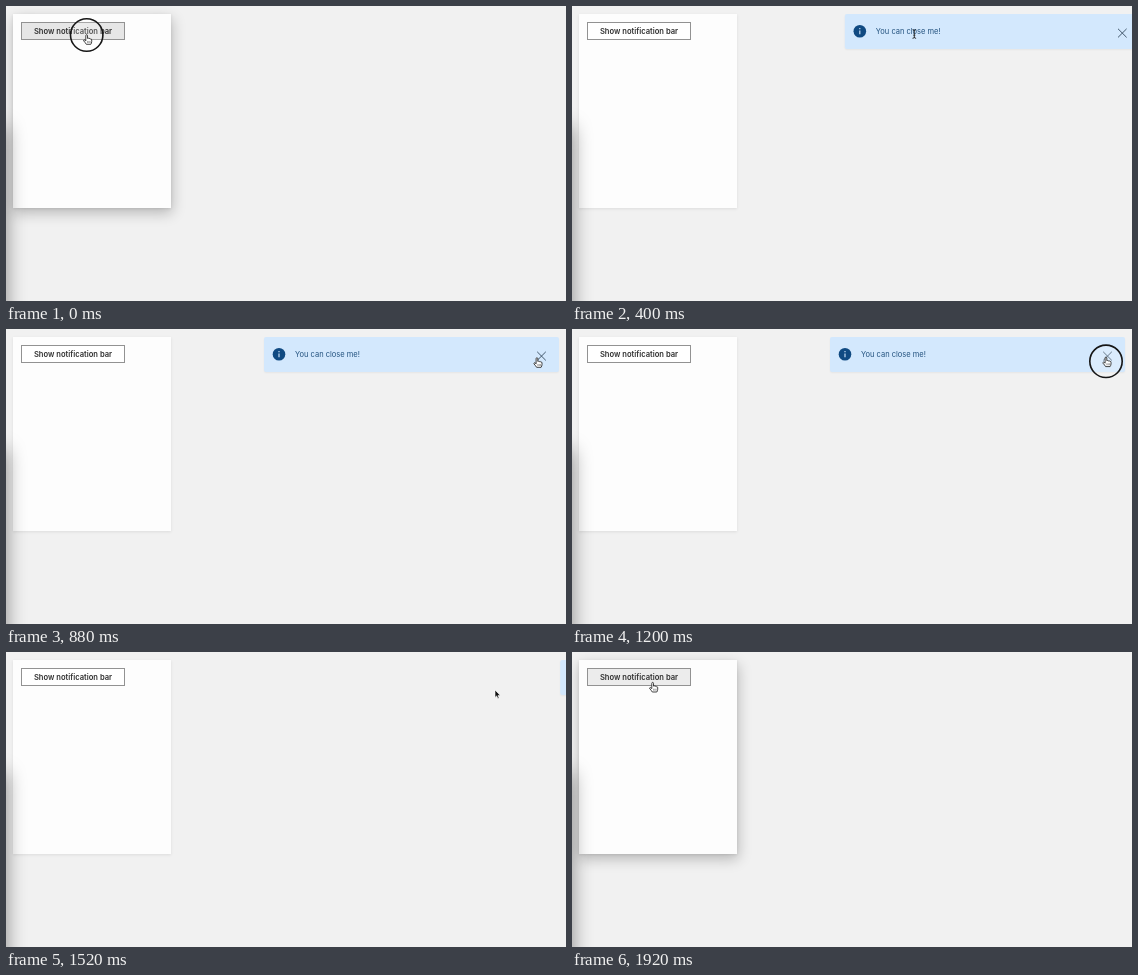
Animation, 560 px wide and 295 px high, one loop 2000 ms. Source, as an HTML page:

```html
<!DOCTYPE html>
<html lang="en">
<head>
<meta charset="utf-8">
<title>Notification bar</title>
<style>
  html, body { margin: 0; width: 560px; height: 295px; overflow: hidden; background: #f1f1f1; }
  #stage { position: relative; width: 560px; height: 295px; overflow: hidden; font-family: Inter, Arial, sans-serif; }
  #stage > * { position: absolute; box-sizing: border-box; }
  #card, #lift { left: 7px; top: 8px; width: 157.5px; height: 194px; }
  #card { background: #fdfdfd; box-shadow: 0 1px 3px rgba(0,0,0,.09); }
  #lift { box-shadow: 1px 5px 13px rgba(0,0,0,.24); }
  #edge { left: -30px; top: 122px; width: 30px; height: 260px; box-shadow: 0 0 19px 1px rgba(0,0,0,.4); }
  #button { left: 15px; top: 16px; width: 104px; height: 18px; border: 1px solid #929292; background: #fff;
    color: #303030; font-size: 7.6px; font-weight: 600; line-height: 17px; text-align: center; white-space: nowrap; }
  #bar { left: 258px; top: 8px; width: 295px; height: 35px; border-radius: 2px; background: #d3e8fd; box-shadow: 0 1px 2px rgba(0,0,0,.05); }
  svg { display: block; overflow: visible; }
  #bar text { font-size: 7.5px; fill: #23527f; }
</style>
</head>
<body>
<div id="stage">
  <div id="lift"></div>
  <div id="card"></div>
  <div id="edge"></div>
  <div id="button">Show notification bar</div>
  <div id="bar">
    <svg width="295" height="35">
      <circle cx="15" cy="17.3" r="6.3" fill="#104a82"/>
      <path d="M15 16.6v3.6M15 14.1v1.2" stroke="#d3e8fd" stroke-width="1.1"/>
      <text x="31" y="20.2">You can close me!</text>
      <path d="M273.2 14.8l8.6 8.6m0-8.6l-8.6 8.6" stroke="#33485c" stroke-width=".9"/>
    </svg>
  </div>
  <svg width="560" height="295">
    <circle id="ring" r="16.2" fill="rgba(255,255,255,.2)" stroke="#161616" stroke-width="1.6"/>
    <g id="arrow"><path d="M0 0V7.4L1.7 5.9L2.8 8.5L4.1 7.9L3 5.4H5.3Z" fill="#111" stroke="#fff" stroke-width=".6"/></g>
    <g id="hand"><path d="M-.9 .7Q-.8-.4 0-.3Q.8-.2 .8 .7V3.4Q1.8 2.9 2.3 3.6Q3.4 3.1 3.8 4Q5.1 3.9 5 5V6.6Q4.9 8.1 4.1 9.3H-.4Q-1.2 7.9-2.9 6Q-3.5 5.1-2.6 4.8Q-1.9 4.7-.9 5.9Z" fill="#fff" stroke="#222" stroke-width=".85" stroke-linejoin="round"/>
      <path d="M.9 6v2M2.2 6v2M3.4 6v2" stroke="#444" stroke-width=".5"/></g>
    <g id="beam"><path d="M-1.8-4.3Q0-4.3 0-3.2Q0-4.3 1.8-4.3M0-3.4V3.4M-1.8 4.3Q0 4.3 0 3.2Q0 4.3 1.8 4.3M-1 1.2H1" fill="none" stroke="#222" stroke-width=".9"/></g>
  </svg>
</div>
<script>
const LOOP = 2000, STEP = 80;
const $ = id => document.getElementById(id);

// [time, cursor, x, y]
const path = [
  [0, 'hand', 80.7, 29], [160, 'arrow', 81, 28.5], [320, 'arrow', 190, 31],
  [400, 'beam', 342.3, 28], [480, 'arrow', 389, 27], [560, 'arrow', 413, 25],
  [640, 'arrow', 452, 24], [720, 'arrow', 488, 25], [800, 'arrow', 515, 27],
  [880, 'hand', 531, 29], [960, 'hand', 533, 29], [1040, 'hand', 534, 28.3],
  [1440, 'arrow', 525, 33], [1520, 'arrow', 489, 38], [1600, 'arrow', 366, 41],
  [1680, 'arrow', 202, 37], [1760, 'arrow', 122, 30], [1840, 'hand', 87, 30.5],
  [1920, 'hand', 80.7, 30.7]
];
// [time, card lift, button grey level]
const hover = [
  [0, 1, 230], [80, .9, 234], [160, .4, 248], [240, 0, 255],
  [1760, .35, 255], [1840, .8, 243], [1920, 1, 236]
];

const at = (table, t) => table.filter(row => row[0] <= t).pop();

const slide = $('bar').animate([
  { transform: 'translateX(304px)', offset: 0 },
  { transform: 'translateX(304px)', offset: .055, easing: 'ease' },
  { transform: 'none', offset: .255 },
  { transform: 'none', offset: .605, easing: 'ease' },
  { transform: 'translateX(304px)', offset: .8 },
  { transform: 'translateX(304px)', offset: 1 }
], LOOP);
slide.pause();

function draw(t) {
  slide.currentTime = t;
  const [, kind, x, y] = at(path, t);
  for (const id of ['arrow', 'hand', 'beam']) {
    $(id).style.display = id === kind ? '' : 'none';
    $(id).setAttribute('transform', `translate(${x} ${y})`);
  }
  const click = t === 0 || t === 1200;
  $('ring').style.display = click ? '' : 'none';
  $('ring').setAttribute('transform', `translate(${x} ${t ? y + 4 : y})`);
  const [, lift, grey] = at(hover, t);
  $('lift').style.opacity = lift;
  $('button').style.background = `rgb(${grey},${grey},${grey})`;
}

const start = performance.now();
function tick() {
  const t = (performance.now() - start) % LOOP;
  draw(Math.floor(t / STEP) * STEP);
  requestAnimationFrame(tick);
}
draw(0);
requestAnimationFrame(tick);
</script>
</body>
</html>
```
